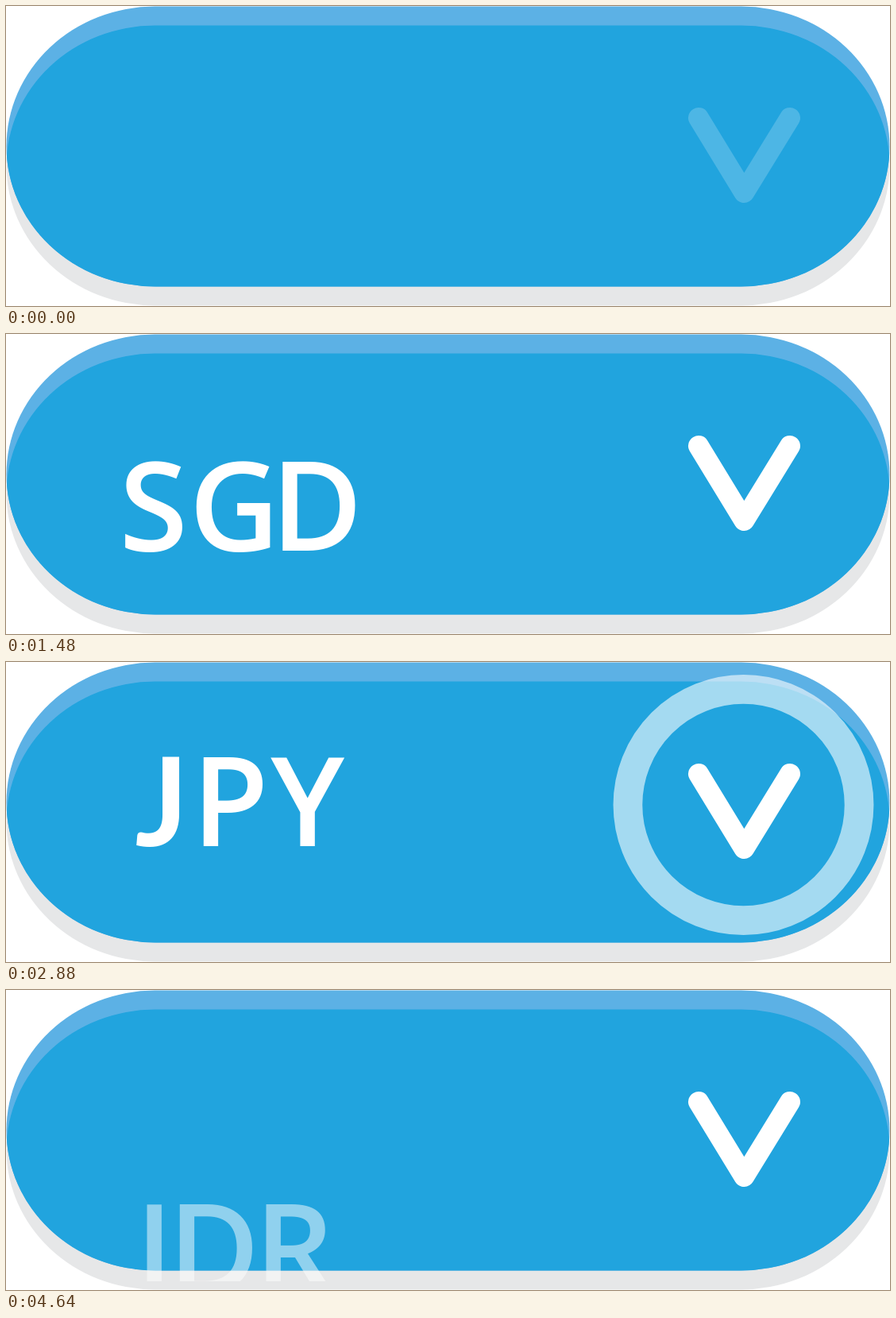
Write an HTML page that moves like this. It is 1113 px wide and 378 px high and loops after 4.68 s.

```html
<!DOCTYPE html>
<html lang="en">
<head>
<meta charset="utf-8">
<title>Currency selector</title>
<style>
  html, body { margin: 0; width: 100%; height: 100%; overflow: hidden; background: #fff; }
  svg { display: block; width: 100vw; height: 100vh; }
  text { font: 600 157px "Open Sans", sans-serif; fill: #fff; }
  .hook { font: 700 156px Lato, sans-serif; }
</style>
</head>
<body>
<svg viewBox="0 0 1113 378" xmlns="http://www.w3.org/2000/svg">
  <defs>
    <clipPath id="pill"><rect x=".5" y=".5" width="1112" height="353" rx="187" ry="176.5"/></clipPath>
    <clipPath id="window"><rect width="1113" height="367"/></clipPath>
  </defs>
  <rect x=".5" y="24.5" width="1112" height="353" rx="187" ry="176.5" fill="#e6e7e8"/>
  <rect x=".5" y=".5" width="1112" height="353" rx="187" ry="176.5" fill="#5cb1e5"/>
  <g clip-path="url(#pill)">
    <rect x=".5" y="24.5" width="1112" height="353" rx="187" ry="176.5" fill="#21a4de"/>
  </g>
  <g id="labels" clip-path="url(#window)"></g>
  <circle id="ring" cx="928.5" cy="180" fill="none" stroke="#fff"/>
  <path id="arrow" d="M872 141 929.3 235 987 141" fill="none" stroke="#fff"
        stroke-width="26" stroke-linecap="round" stroke-linejoin="round"/>
</svg>
<script>
const LOOP = 4680, STEP = 40, BASELINE = 232;
const NS = "http://www.w3.org/2000/svg";
const $ = id => document.getElementById(id);
const pen = document.createElement("canvas").getContext("2d");

// start time, arrow delay, letters and the centre of each letter
const cycles = [
  { start: 240, delay: 0, word: "USD", centers: [189.3, 292, 395] },
  { start: 1400, delay: 0, word: "SGD", centers: [186, 286, 393.5] },
  { start: 2520, delay: 40, word: "JPY", centers: [191, 285.5, 379.7] },
  { start: 3680, delay: 0, word: "IDR", centers: [186.8, 264, 369.3], last: true }
];

// piecewise linear curve through [time, value] points
function curve(points, t) {
  if (t <= points[0][0]) return points[0][1];
  for (let i = 1; i < points.length; i++) {
    const [t0, a] = points[i - 1], [t1, b] = points[i];
    if (t < t1) return a + (b - a) * (t - t0) / (t1 - t0);
  }
  return points[points.length - 1][1];
}

const drop = [[0, -120], [40, 47.1], [320, 4.2], [360, 0], [920, 0], [960, 150], [1000, 300]];
const textFade = [[-40, 0], [40, 1], [920, 1], [1000, 0]];
const ringFade = [[80, 0], [200, 1], [250, 1], [520, 0]];
const arrowIn = [[-40, .2], [80, 1]];
const arrowOut = [[520, 1], [680, .2]];

function makeLabel({ word, centers }) {
  const text = document.createElementNS(NS, "text");
  [...word].forEach((char, i) => {
    const span = document.createElementNS(NS, "tspan");
    const hook = char === "J";
    pen.font = hook ? "700 156px Lato, sans-serif" : '600 157px "Open Sans", sans-serif';
    const ink = pen.measureText(char);
    span.textContent = char;
    if (hook) span.setAttribute("class", "hook");
    span.setAttribute("x", centers[i] - (ink.actualBoundingBoxRight - ink.actualBoundingBoxLeft) / 2);
    span.setAttribute("y", BASELINE);
    text.append(span);
  });
  $("labels").append(text);
  return text;
}

for (const c of cycles) c.label = makeLabel(c);

function draw(time) {
  const t = Math.floor(time % LOOP / STEP) * STEP;
  let ringAlpha = 0, arrowAlpha = .2;
  for (const c of cycles) {
    const s = t - c.start;
    const on = s >= 0 && s < 1000;
    c.label.setAttribute("visibility", on ? "visible" : "hidden");
    if (!on) continue;
    c.label.setAttribute("transform", `translate(0 ${curve(drop, s)})`);
    c.label.setAttribute("opacity", curve(textFade, s));
    ringAlpha = curve(ringFade, s);
    const outer = 152.6 + (s - 320) * .284;
    $("ring").setAttribute("r", outer * .888);
    $("ring").setAttribute("stroke-width", outer * .224);
    arrowAlpha = s > 520 && !c.last ? curve(arrowOut, s) : curve(arrowIn, s - c.delay);
  }
  $("ring").setAttribute("opacity", ringAlpha);
  $("arrow").setAttribute("opacity", arrowAlpha);
}

const begin = performance.now();
function tick() {
  draw(performance.now() - begin);
  requestAnimationFrame(tick);
}
tick();
</script>
</body>
</html>
```
